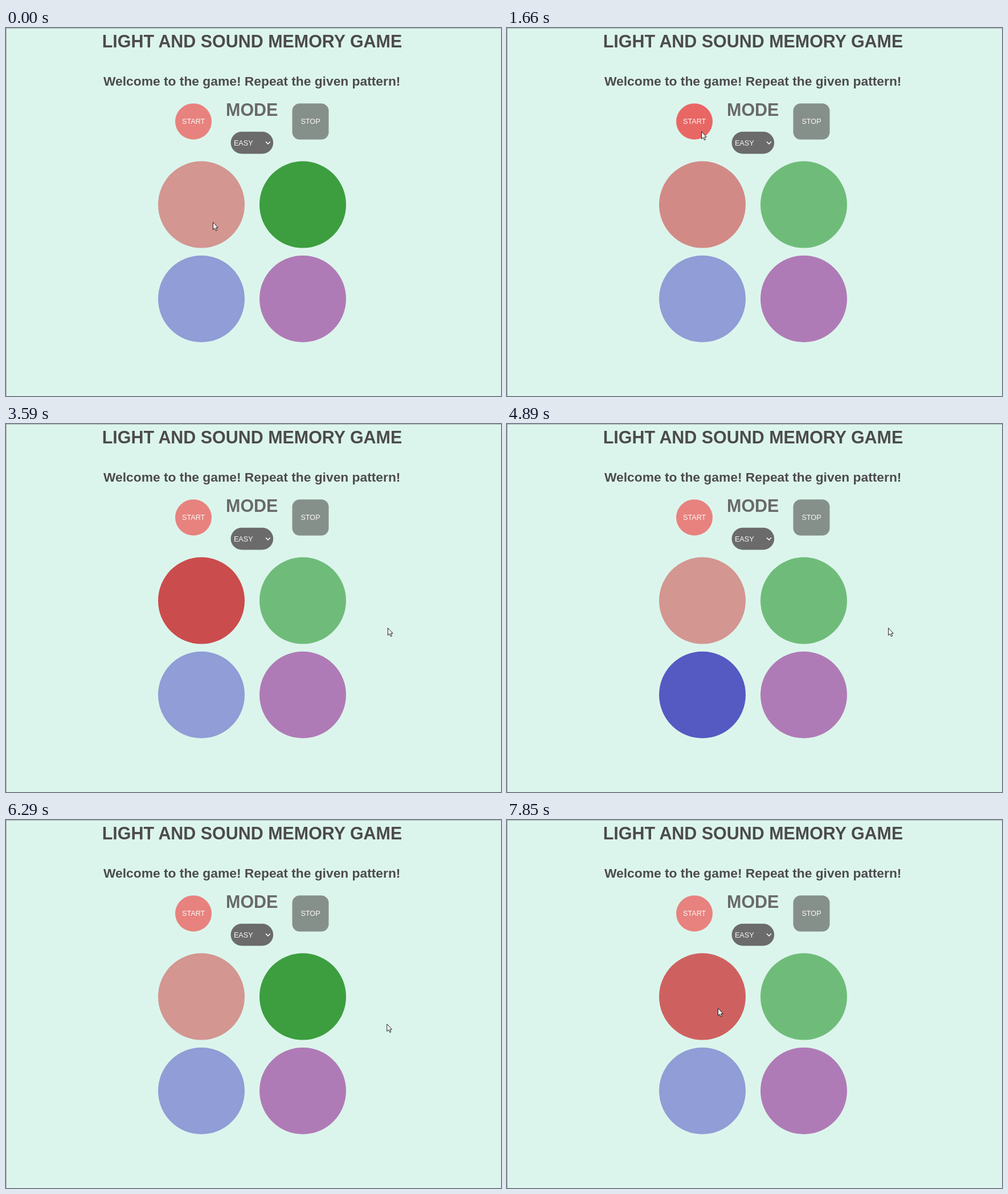
Animation, 869 px wide and 645 px high, one loop 8000 ms. Source, as an HTML page:

```html
<!DOCTYPE html>
<html lang="en">
<head>
<meta charset="utf-8">
<title>Memory game</title>
<style>
  html, body { margin: 0; width: 100%; height: 100%; overflow: hidden; background: #dcf5ec; }
  svg { display: block; }
  text { font-family: "Liberation Sans", Arial, sans-serif; text-anchor: middle; }
  .head { font-weight: bold; fill: #4c4b4c; }
  .label { font-size: 12.64px; fill: #fbf8f7; }
</style>
</head>
<body>
<svg width="869" height="645" viewBox="0 0 869 645">
  <rect width="869" height="645" fill="#dcf5ec"/>
  <path d="M0 .5H869M.5 0V645" stroke="#a3aea9"/>

  <text class="head" x="432" y="34.4" font-size="30.45">LIGHT AND SOUND MEMORY GAME</text>
  <text class="head" x="431.7" y="101" font-size="22.8">Welcome to the game! Repeat the given pattern!</text>
  <text class="head" x="431.7" y="154" font-size="30.45" style="fill:#696969">MODE</text>

  <rect id="start" x="297" y="132.2" width="64" height="63.3" rx="32"/>
  <text class="label" x="329.2" y="167.5">START</text>
  <rect x="502.5" y="132.2" width="64" height="63.3" rx="13" fill="#86908b"/>
  <text class="label" x="534.5" y="167.5">STOP</text>
  <rect x="394.5" y="181.7" width="74.7" height="38.8" rx="19.4" fill="#6b6b6b"/>
  <text class="label" x="416.8" y="205.5">EASY</text>
  <path d="M456 199.3l3.9 3.9 3.9-3.9" fill="none" stroke="#fff" stroke-width="1.6"/>

  <circle id="red" cx="343" cy="309.6" r="76"/>
  <circle id="green" cx="521" cy="309.6" r="76"/>
  <circle id="blue" cx="343" cy="474.7" r="76"/>
  <circle cx="521" cy="474.7" r="76" fill="#af7bb6"/>

  <path id="cursor" d="M.5 .6V13.4L3.4 10.7 5.5 15.4 7.5 14.5 5.5 10H9.2Z" fill="#fff" stroke="#111" stroke-width=".95"/>
</svg>
<script>
const LOOP = 8000, BEAT = 137, LEAD = 45; // the picture steps once per beat
const FIRST = 19, GAP = 10, HOLD = 6, FADE = 4; // pattern timing in beats
const $ = id => document.getElementById(id);
const mix = (a, b, k) => a + (b - a) * k;
const ease = k => (k = Math.min(1, Math.max(0, k)), k * k * (3 - 2 * k));
const fade = (n, off) => 1 - ease((n - off) / FADE);

// A flash lights at once; a hover swells over two beats. Both fade alike.
const flash = (n, on) => n < on ? 0 : fade(n, on + HOLD);
const hover = (n, on, off, peak) => peak * ease((n - on + 1) / 2) * fade(n, off);
const turn = k => FIRST + k * GAP;

const lamps = {
  start: { idle: [231, 130, 126], lit: [232, 103, 100], glow: n => hover(n, 8, 21, 1) },
  red: {
    idle: [211, 150, 145], lit: [202, 62, 63],
    glow: n => Math.max(flash(n, turn(0)), hover(n, 1, FIRST, .14), hover(n, 53, 60, .6))
  },
  blue: { idle: [144, 157, 214], lit: [74, 76, 190], glow: n => flash(n, turn(1)) },
  green: {
    idle: [111, 188, 122], lit: [50, 153, 52],
    glow: n => Math.max(flash(n, turn(2)), n < FIRST ? flash(n, -1 - HOLD) : 0)
  }
};

// Stops of the pointer: beat, x, y. It glides straight between them.
const stops = [
  [1, 363, 340], [5, 438, 199], [6, 450, 196], [9, 341, 181], [16, 341, 181], [19, 363, 293],
  [21, 375, 333], [22, 584, 137], [25, 670, 357], [50, 668, 357], [52, 404, 332], [55, 370, 329.5]
];

function pointer(n) {
  const i = stops.findIndex(s => s[0] > n);
  if (i < 1) return stops.at(i).slice(1);
  const [t0, x0, y0] = stops[i - 1], [t1, x1, y1] = stops[i];
  const k = (n - t0) / (t1 - t0);
  return [mix(x0, x1, k), mix(y0, y1, k)];
}

function draw(time) {
  const n = Math.floor((time % LOOP + LEAD) / BEAT);
  for (const [id, { idle, lit, glow }] of Object.entries(lamps)) {
    const rgb = idle.map((c, i) => Math.round(mix(c, lit[i], glow(n))));
    $(id).setAttribute('fill', `rgb(${rgb})`);
  }
  $('cursor').setAttribute('transform', `translate(${pointer(n).join(' ')})`);
}

const begin = performance.now();
function tick() {
  draw(performance.now() - begin);
  requestAnimationFrame(tick);
}
tick();
</script>
</body>
</html>
```
